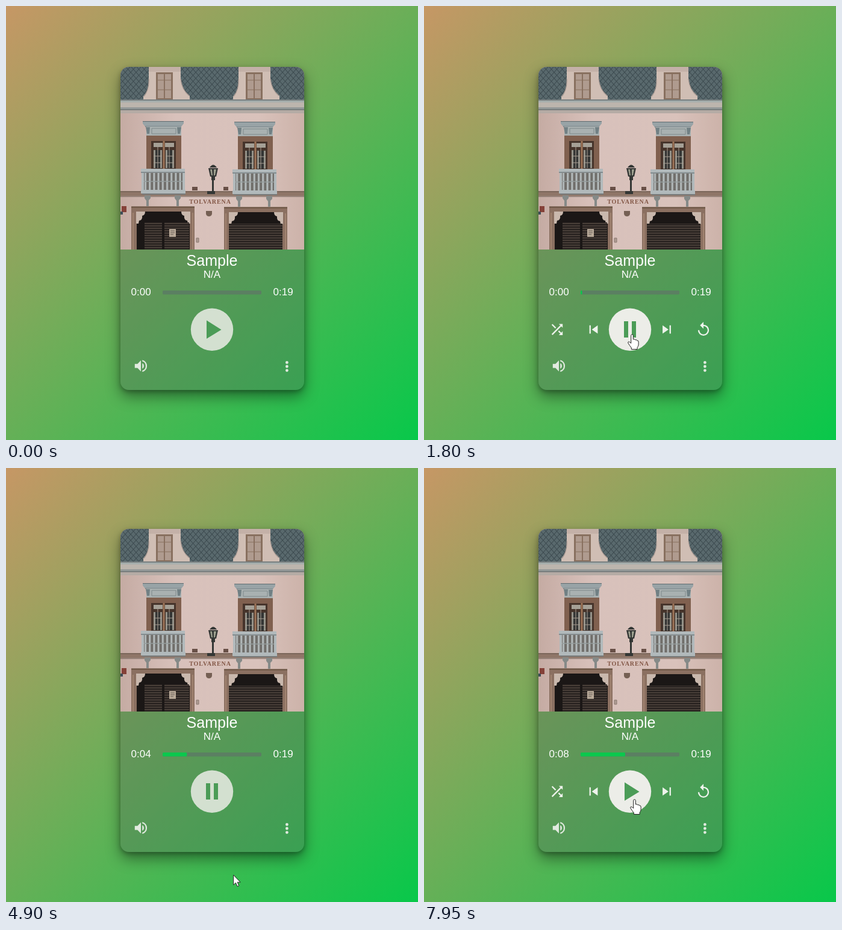
An HTML page that plays this animation: 684 px wide and 720 px high, repeating every 8 s.

```html
<!DOCTYPE html>
<html lang="en">
<head>
<meta charset="utf-8">
<title>Music player card</title>
<style>
html, body { margin: 0; width: 100%; height: 100%; overflow: hidden; }
body { position: relative; background: linear-gradient(135deg, #c69765, #08c84a); }
.card {
  position: absolute; left: 190px; top: 101px; width: 305px; height: 536px;
  border-radius: 14px; background: rgba(84, 98, 92, .32);
  box-shadow: 0 11px 24px rgba(0, 0, 0, .42), 0 3px 7px rgba(0, 0, 0, .25);
}
svg { position: absolute; left: 0; top: 0; display: block; }
text { font-family: "Liberation Sans", Arial, sans-serif; fill: #fff; }
</style>
</head>
<body>
<div class="card"></div>
<svg width="684" height="720" viewBox="0 0 684 720">
  <defs>
    <clipPath id="top"><path d="M190 404V115a14 14 0 0 1 14-14H481a14 14 0 0 1 14 14V404z"/></clipPath>
    <linearGradient id="wall" x2="1">
      <stop stop-color="#c5aba3"/><stop offset=".3" stop-color="#d8c1bb"/>
      <stop offset=".75" stop-color="#d9c2bb"/><stop offset="1" stop-color="#ccb2a9"/>
    </linearGradient>
    <pattern id="slate" width="9" height="10" patternUnits="userSpaceOnUse">
      <rect width="9" height="10" fill="#59696d"/>
      <path d="M0 0L4.5 5L9 0M0 10L4.5 5L9 10" fill="none" stroke="#3d4b50" stroke-width="1.1"/>
    </pattern>
    <pattern id="slats" width="8" height="4" patternUnits="userSpaceOnUse">
      <rect width="8" height="4" fill="#27211f"/><rect width="8" height="1.5" fill="#51463f"/>
    </pattern>
    <pattern id="posts" x="228" width="7.2" height="40" patternUnits="userSpaceOnUse">
      <path d="M2 0h3v40h-3z" fill="#b4bbbc"/>
    </pattern>

    <g id="dormer">
      <path d="M237 101H290V121Q292 137 299 143L305 149V156H228V150Q238 139 237 122z" fill="#d0beb4"/>
      <path d="M237 101h53v8h-53z" fill="#c4b1a8"/>
      <path d="M237 121Q238 139 229 150M290 121Q292 139 304 149" fill="none" stroke="#a3958f" stroke-width="1.2"/>
      <path d="M249 110h28v45h-28z" fill="#88705f"/>
      <path d="M252 113h10v40h-10zM264 113h10v40h-10z" fill="#af9b8f"/>
      <path d="M252 123h22M252 139h22" stroke="#88705f"/>
    </g>

    <g id="window">
      <path d="M227 191h68v4l-4 5h-60l-4-5z" fill="#98a3a6"/>
      <path d="M227 191.5h68M231 200h60" stroke="#606d71"/>
      <path d="M233 200h58v15h-58z" fill="#a9b1b1"/>
      <path d="M242 203h40v9h-40z" fill="none" stroke="#7e898b"/>
      <path d="M232 201h7l-1 11h-4zM284 201h7l-2 11h-4z" fill="#718084"/>
      <path d="M233 215h58v56h-58z" fill="#80604f"/>
      <path d="M241 224h41v47h-41z" fill="#46342b"/>
      <path d="M245 227h15v7h-15zM264 227h15v7h-15z" fill="#a5a096"/>
      <path d="M245 239h14v30h-14zM265 239h14v30h-14z" fill="#939188"/>
      <path d="M248 239h8v30h-8zM268 239h8v30h-8z" fill="#343534"/>
      <path d="M245 249h14m6 0h14M245 260h14m6 0h14M252 227v42M271 227v42" stroke="#aaa094"/>
      <path d="M262 224v46" stroke="#9d7458" stroke-width="3"/>
      <path d="M227 277h68v29h-68z" fill="#706e6a"/>
      <path d="M227 277h68v29h-68z" fill="url(#posts)"/>
      <path d="M228 291h66" stroke="#959c9c" stroke-width="1.5"/>
      <path d="M224 270h73v6h-73zM225 276h4v30h-4zM293 276h4v30h-4zM224 305h74v6h-74z" fill="#b1b9bb"/>
      <path d="M224 276h73M226 312h72" stroke="#727e81" stroke-width="1.5"/>
      <path d="M230 314h10v5l-3 3v10h-4v-9l-3-4zM280 314h10v5l-3 3v10h-4v-9l-3-4z" fill="#858a88"/>
    </g>

    <g id="gate">
      <path d="M208 333H313V404H208z" fill="#8b7061"/>
      <path d="M208 333.5H313" stroke="#66503f" stroke-width="2"/>
      <path d="M217 341H305V404H217z" fill="#1b1716"/>
      <path d="M216 341h15q0 6-5 7q1 7-5 8l-1 5h-4zM306 341h-15q0 6 5 7q-1 7 5 8l1 5h4z" fill="#c9b8ad"/>
      <path d="M211 343v61M310 343v61" stroke="#a18370" stroke-width="2"/>
    </g>
  </defs>

  <g clip-path="url(#top)">
    <path d="M190 101H495V404H190z" fill="url(#wall)"/>
    <path d="M190 101H495V156H190z" fill="url(#slate)"/>
    <use href="#dormer"/><use href="#dormer" x="149"/>
    <path d="M190 155H495V160H190z" fill="#a7afad"/>
    <path d="M190 160H495V168H190z" fill="#bcb5ad"/>
    <path d="M190 168H495V172H190z" fill="#949998"/>
    <path d="M190 156H495M190 172H495" stroke="#697273" stroke-width="1.4"/>
    <path d="M190 173H495V178H190z" fill="#b5aba5"/>
    <path d="M190 307H495V315H190z" fill="#8f7668"/>
    <path d="M190 308H495M190 316H495" stroke="#67564c"/>
    <path d="M309 300h9v6h-9zM361 300h8v6h-8z" fill="#685047"/>
    <use href="#window"/><use href="#window" x="152" y="1"/>
    <g fill="#343735">
      <path d="M336 269h16l-3 14h-10zM338 268q6-9 12 0zM341 283h6v6h-2v20h-3v-20h-1zM334 307h13v5h-13z"/>
      <path d="M339 271h3l1 10h-2zM345 271h4l-2 10h-2z" fill="#9da08f"/>
    </g>
    <text x="339" y="328" text-anchor="middle" style="font:bold 10px 'Liberation Serif',serif;fill:#835746;letter-spacing:.9px">TOLVARENA</text>
    <path d="M332 340h10v5q-1 4-5 4t-5-4z" fill="#756054"/>
    <use href="#gate"/><use href="#gate" x="154" y="1"/>
    <path d="M230 359h29v45h-29zM263 359h41v45h-41zM370 361h89v43h-89z" fill="url(#slats)"/>
    <path d="M271 370h11v13h-11z" fill="#b9aa99"/>
    <path d="M273 373h7m-7 3h7m-7 3h5" stroke="#675d54"/>
    <path d="M316 385h4v7h-4z" fill="#ad9b92" stroke="#8a7970"/>
    <path d="M192 332h8v10h-8z" fill="#854138"/><path d="M190 341h4v5h-4z" fill="#404e59"/>
  </g>

  <text x="342" y="430.5" font-size="25" text-anchor="middle">Sample</text>
  <text x="342" y="451" font-size="17" text-anchor="middle">N/A</text>
  <text id="clock" x="207.5" y="480" font-size="17">0:00</text>
  <text x="443.5" y="480" font-size="17">0:19</text>
  <rect x="260" y="472" width="164" height="6.5" rx="1.5" fill="#5b7f62"/>
  <rect id="bar" x="260" y="472" height="6.5" rx="1.5" fill="#0bc84d"/>

  <circle id="disc" cx="342" cy="536.7" r="35.2" fill="#eeeeea"/>
  <path id="play" d="M333 521.5L357.5 537L333 552z" fill="#4b9c57"/>
  <path id="pause" d="M332 523h7v27h-7zM345 523h7v27h-7z" fill="#4b9c57"/>
  <g id="side" fill="#eef3ec">
    <path d="M10.59 9.17L5.41 4L4 5.41l5.17 5.17zM14.5 4l2.04 2.04L4 18.59L5.41 20L17.96 7.46L20 9.5V4zm.33 9.41l-1.41 1.41l3.13 3.13L14.5 20H20v-5.5l-2.04 2.04z"/>
    <path d="M6 6h2v12H6zm3.5 6l8.5 6V6z"/>
    <path d="M6 18l8.5-6L6 6zM16 6v12h2V6z"/>
    <path d="M12 5V1L7 6l5 5V7a6 6 0 1 1-6 6H4a8 8 0 1 0 8-8z"/>
  </g>
  <g fill="#e1eadf">
    <path transform="translate(210.4 583.6) scale(1.13)" d="M3 9v6h4l5 5V4L7 9zm13.5 3A4.5 4.5 0 0 0 14 7.97v8.05A4.5 4.5 0 0 0 16.5 12zM14 3.23v2.06a7 7 0 0 1 0 13.42v2.06a9 9 0 0 0 0-17.54z"/>
    <circle cx="466.4" cy="591.4" r="2.4"/><circle cx="466.4" cy="598" r="2.4"/><circle cx="466.4" cy="604.6" r="2.4"/>
  </g>

  <g fill="#fff" stroke="#222" stroke-linejoin="round">
    <path id="arrow" d="M0 0V16.5L3.8 13L6.4 19L9 17.9L6.5 12H11.5z"/>
    <path id="hand" d="M-1.8 1.5Q-1.8 0 0 0T1.8 1.5V8Q4.8 7 5.2 9Q7.8 8 8.2 10Q10.6 9.6 10.6 12V17Q10.4 19.5 8.6 21.5V24.5H-1.2V22Q-4 18.6-6.6 14.2Q-7.3 12.3-5.8 12Q-4.2 11.8-1.8 14.5z"/>
  </g>
</svg>
<script>
const el = id => document.getElementById(id);
const LOOP = 8000, STEP = 200, PX_PER_SEC = 8.4;
const PLAY_AT = 1725, PAUSE_AT = 7750;
const HOVERS = [[850, 4450], [6870, 9000]];
const FADE = 400;
const offsets = [-121, -60.5, 61, 122];

// [time, x, y] of the pointer tip
const pointer = [
  [400, 357, 722], [850, 350, 572], [900, 349, 562], [1150, 345.5, 545], [4250, 345.5, 545],
  [4450, 375, 580], [4700, 379, 645], [5000, 377, 690], [6250, 377, 690],
  [6750, 381, 598], [6900, 366, 571], [7050, 349.5, 550]
];
const progress = [[1700, 2.5], [4450, 36], [7950, 74]];

// Linear interpolation through timed keys
function at(keys, t, col = 1) {
  const i = keys.findIndex(k => k[0] > t);
  if (i === 0) return keys[0][col];
  if (i < 0) return keys[keys.length - 1][col];
  const a = keys[i - 1], b = keys[i];
  return a[col] + (b[col] - a[col]) * (t - a[0]) / (b[0] - a[0]);
}

// CSS "ease" curve
function ease(x) {
  if (x <= 0 || x >= 1) return x <= 0 ? 0 : 1;
  const bez = (s, a, b) => 3 * s * (1 - s) * (1 - s) * a + 3 * s * s * (1 - s) * b + s * s * s;
  let lo = 0, hi = 1;
  for (let i = 0; i < 20; i++) {
    const mid = (lo + hi) / 2;
    if (bez(mid, .25, .25) < x) lo = mid; else hi = mid;
  }
  return bez(lo, .1, 1);
}

const show = (node, on) => node.setAttribute("visibility", on ? "visible" : "hidden");

function draw(t) {
  const open = HOVERS.reduce((sum, [a, b]) => sum + ease((t - a) / FADE) - ease((t - b) / FADE), 0);
  const playing = t >= PLAY_AT && t < PAUSE_AT;
  const tick = t < PAUSE_AT ? Math.floor((t - 50) / STEP) * STEP + 50 : LOOP;
  const width = t < PLAY_AT ? 0 : at(progress, tick);

  el("bar").setAttribute("width", width);
  el("clock").textContent = "0:0" + Math.floor(width / PX_PER_SEC);
  el("disc").setAttribute("opacity", .83 + .16 * open);
  show(el("play"), !playing);
  show(el("pause"), playing);

  el("side").setAttribute("opacity", Math.min(1, open * 9));
  [...el("side").children].forEach((icon, i) =>
    icon.setAttribute("transform", `translate(${342 + offsets[i] * open - 13.8} ${536.7 - 13.8}) scale(1.15)`));

  const hovering = HOVERS.some(([a, b]) => t >= a && t < b + 50);
  for (const [id, on] of [["hand", hovering], ["arrow", !hovering && t >= 400]]) {
    show(el(id), on);
    el(id).setAttribute("transform", `translate(${at(pointer, t)} ${at(pointer, t, 2)})`);
  }
}

const start = performance.now();
function frame() {
  draw((performance.now() - start) % LOOP);
  requestAnimationFrame(frame);
}
frame();
</script>
</body>
</html>
```
